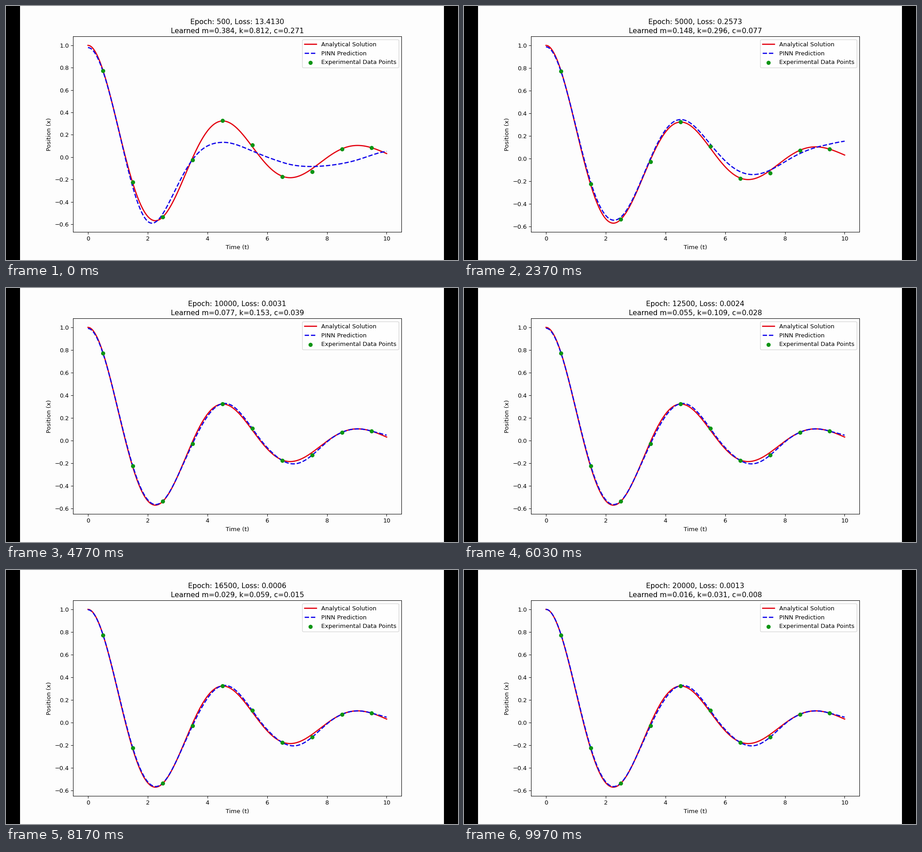
A matplotlib script that plays this animation: 998 by 561 pixels, repeating every 10000 ms.

```python
import numpy as np
import matplotlib.pyplot as plt
from matplotlib.animation import FuncAnimation
from matplotlib.patches import Rectangle

W, H, DPI = 998, 561, 93.5
PAGE_X, PAGE_W = 31, 936
PAPER, RED, BLUE, GREEN = "#fdfdfd", "#e3000f", "#0d00ea", "#0b9414"
STEPS, STEP_MS, EPOCHS_PER_STEP = 40, 250, 500


def exact(t, m=1.0, k=2.0, c=0.5):
    """Underdamped oscillator released from x = 1 at rest."""
    decay = c / (2 * m)
    omega = np.sqrt(k / m - decay ** 2)
    return np.exp(-decay * t) * (np.cos(omega * t) + decay / omega * np.sin(omega * t))


def ease_through(keys, t):
    """Cosine easing from one turning point (time, value) to the next."""
    kt, kv = np.array(keys).T
    i = np.clip(np.searchsorted(kt, t, side="right") - 1, 0, len(kt) - 2)
    u = (t - kt[i]) / (kt[i + 1] - kt[i])
    return kv[i] + (kv[i + 1] - kv[i]) * (1 - np.cos(np.pi * u)) / 2


# Turning points of the prediction error as training goes on
rough = [(0, -0.02), (0.9, 0), (1.85, -0.05), (2.9, 0.064), (4.5, -0.191),
         (6.55, 0.125), (8.75, -0.14), (10.6, 0.07)]
better = [(0, -0.016), (2, 0.052), (3, 0.021), (4, 0.076), (4.95, 0.016),
          (6.5, 0.123), (8.45, -0.053), (11.2, 0.39)]
close = [(0, -0.01), (1.8, 0.008), (2.8, 0.002), (3.9, -0.04), (5, 0.03),
         (7.3, -0.027), (8.5, -0.005), (9.2, -0.005), (10.4, 0.045)]
fitted = [(0, -0.01), (1.6, 0.011), (2.8, 0.002), (3.75, -0.023), (5, 0.017),
          (6, 0.011), (7.2, -0.029), (8.3, -0.001), (9.4, 0), (10.4, 0.025)]
stages = {500: rough, 3000: better, 7000: close, 10000: fitted,
          20000: [(0, 0)] + fitted[1:]}

t = np.linspace(0, 10, 500)
truth = exact(t)
errors = np.array([ease_through(keys, t) for keys in stages.values()])

# The trained curve runs through the measurements
t_data = np.arange(0.5, 10)
x_data = exact(t_data) + ease_through(fitted, t_data)

log_epochs = [500, 3000, 7000, 10000, 14500, 18500, 20000]
log_loss = np.log([13.413, 2.0363, 0.0325, 0.0031, 0.0020, 0.0002, 0.0013])
log_mass = np.log([0.3842, 0.2113, 0.1034, 0.0766, 0.0416, 0.0206, 0.0156])


def prediction(epoch):
    pos = np.interp(epoch, list(stages), range(len(stages)))
    i = min(int(pos), len(stages) - 2)
    return truth + errors[i] + (pos - i) * (errors[i + 1] - errors[i])


def caption(epoch):
    loss = np.exp(np.interp(epoch, log_epochs, log_loss))
    m = np.exp(np.interp(epoch, log_epochs, log_mass))
    fade = np.exp(-epoch / 1500)
    k = m * (2 + 0.158 * fade)
    c = m * (0.51 + 0.273 * fade)
    return (f"Epoch: {epoch}, Loss: {loss:.4f}",
            f"Learned m={m:.3f}, k={k:.3f}, c={c:.3f}")


plt.rcParams["font.family"] = "DejaVu Sans"
fig = plt.figure(figsize=((W + 1e-4) / DPI, H / DPI), dpi=DPI, facecolor="black")
fig.add_artist(Rectangle((PAGE_X / W, 0), PAGE_W / W, 1, transform=fig.transFigure,
                         facecolor=PAPER, edgecolor="none", zorder=-1))
ax = fig.add_axes([(PAGE_X + 0.125 * PAGE_W) / W, 0.11, 0.775 * PAGE_W / W, 0.77],
                  facecolor=PAPER)
ax.plot(t, truth, color=RED, lw=2, label="Analytical Solution")
pred_line, = ax.plot(t, truth, "--", color=BLUE, lw=2, label="PINN Prediction")
ax.scatter(t_data, x_data, color=GREEN, zorder=5, label="Experimental Data Points")
ax.set_xlabel("Time (t)")
ax.set_ylabel("Position (x)")
ax.legend(loc="upper right")

center = (PAGE_X + 0.5125 * PAGE_W) / W
titles = [fig.text(center, 1 - y / H, "", ha="center", va="baseline", fontsize=12)
          for y in (40.2, 59.7)]


def draw(step):
    epoch = EPOCHS_PER_STEP * (step + 1)
    pred_line.set_ydata(prediction(epoch))
    for title, line in zip(titles, caption(epoch)):
        title.set_text(line)
    ax.relim()
    ax.autoscale_view()
    return pred_line, *titles


anim = FuncAnimation(fig, draw, frames=STEPS, interval=STEP_MS, repeat=True)
plt.show()
```
